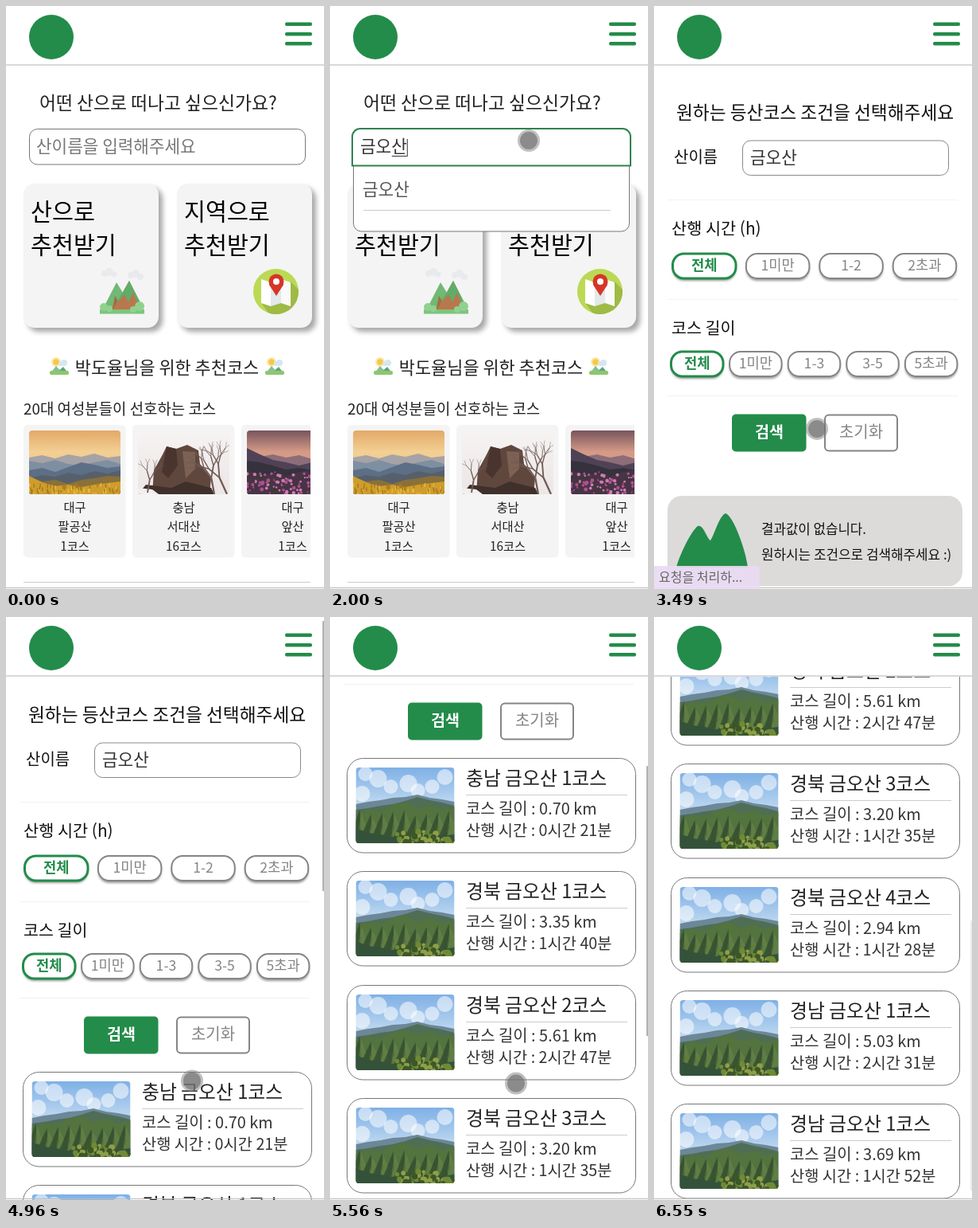
Animation, 400 px wide and 732 px high, one loop 6.68 s. Source, as an HTML page with a canvas:

```html
<!DOCTYPE html>
<html lang="ko">
<head>
<meta charset="utf-8">
<title>등산코스 추천</title>
<style>
html, body { margin: 0; width: 100%; height: 100%; overflow: hidden; background: #fff; }
canvas { display: block; width: 400px; height: 732px; }
</style>
</head>
<body>
<canvas id="stage"></canvas>
<script>
const W = 400, H = 732, LOOP = 6680;
const GREEN = '#238c4a', GREY = '#858585';
const FONT = '"Noto Sans CJK KR", "Noto Sans CJK JP", "Noto Sans", sans-serif';
const canvas = document.getElementById('stage');
const c = canvas.getContext('2d');
const dpr = window.devicePixelRatio || 1;
canvas.width = W * dpr;
canvas.height = H * dpr;

// The screen refreshes in bursts: [start, end, steps]
const ticks = [0];
[[70, 600, 9], [1130, 1130, 1], [1340, 1460, 3], [1610, 1660, 2], [1800, 2000, 3],
 [2470, 3080, 10], [3150, 3760, 10], [3820, 3820, 1], [4020, 4020, 1], [4160, 4220, 2],
 [4490, 4490, 1], [4820, 5420, 10], [5490, 6090, 9], [6170, 6170, 1], [6420, 6550, 2]
].forEach(([a, b, n]) => {
  for (let i = 0; i < n; i++) ticks.push(n > 1 ? a + (b - a) * i / (n - 1) : a);
});

const cursorPath = [[70, 386, 696], [200, 352, 520], [400, 288, 262], [530, 250, 169],
  [2470, 250, 169], [2740, 328, 222], [2900, 348, 262], [3080, 338, 313], [3300, 262, 452],
  [3489, 205, 531], [3760, 169, 534], [3820, 163, 534], [4800, 162, 533], [4886, 234, 582],
  [5420, 234, 585], [5790, 234, 588], [5900, 248, 622], [6090, 303, 728]];
const scrollPath = [[4886, 0], [4953, 11], [5087, 84], [5287, 237], [5420, 344],
  [5790, 668], [5950, 776], [6090, 825]];
const typing = [[1340, 'ㄱ'], [1400, '그'], [1460, '금'], [1610, '금ㅇ'], [1660, '금오'],
  [1800, '금옷'], [1900, '금오사'], [2000, '금오산']];
const matches = {
  '금': ['금오산', '금정산', '금수산', '금학산', '금대봉'],
  '금오': ['금오산', '금오봉'],
  '금오산': ['금오산']
};
const courses = [['충남', 1, '0.70', '0시간 21분'], ['경북', 1, '3.35', '1시간 40분'],
  ['경북', 2, '5.61', '2시간 47분'], ['경북', 3, '3.20', '1시간 35분'],
  ['경북', 4, '2.94', '1시간 28분'], ['경남', 1, '5.03', '2시간 31분'],
  ['경남', 1, '3.69', '1시간 52분']];

function along(path, t) {
  if (t <= path[0][0]) return path[0].slice(1);
  for (let i = 1; i < path.length; i++) {
    const a = path[i - 1], b = path[i];
    if (t <= b[0]) {
      const k = (t - a[0]) / (b[0] - a[0]);
      return a.slice(1).map((v, j) => v + (b[j + 1] - v) * k);
    }
  }
  return path[path.length - 1].slice(1);
}

function random(seed) {
  return () => (seed = (seed * 16807) % 2147483647) / 2147483647;
}

function text(s, x, cy, size, color = '#222', weight = 400, align = 'left') {
  c.font = `${weight} ${size}px ${FONT}`;
  c.textAlign = align;
  c.fillStyle = color;
  c.fillText(s, x, cy + size * 0.37);
}

function box(x, y, w, h, r, fill, stroke, line = 1) {
  c.beginPath();
  c.roundRect(x, y, w, h, r);
  if (fill) { c.fillStyle = fill; c.fill(); }
  if (stroke) { c.shadowColor = 'transparent'; c.strokeStyle = stroke; c.lineWidth = line; c.stroke(); }
}

function shadowed(dx, dy, blur, alpha, draw) {
  c.save();
  c.shadowColor = `rgba(0,0,0,${alpha})`;
  c.shadowOffsetX = dx * dpr;
  c.shadowOffsetY = dy * dpr;
  c.shadowBlur = blur * dpr;
  draw();
  c.restore();
}

function rect(x, y, w, h, color) {
  c.fillStyle = color;
  c.fillRect(x, y, w, h);
}

function dot(x, y, r, color) {
  c.fillStyle = color;
  c.beginPath();
  c.arc(x, y, r, 0, 7);
  c.fill();
}

function poly(color, ...p) {
  c.fillStyle = color;
  c.beginPath();
  for (let i = 0; i < p.length; i += 2) c.lineTo(p[i], p[i + 1]);
  c.fill();
}

function sky(w, h, ...colors) {
  const g = c.createLinearGradient(0, 0, 0, h);
  colors.forEach((col, i) => g.addColorStop(i / (colors.length - 1), col));
  rect(0, 0, w, h, g);
}

// Heights are spread evenly over the width
function ridge(w, h, color, ...ys) {
  const p = ys.flatMap((y, i) => [w * i / (ys.length - 1), y]);
  poly(color, 0, h, ...p, w, h);
}

function photo(x, y, w, h, paint) {
  c.save();
  c.translate(x, y);
  c.beginPath();
  c.roundRect(0, 0, w, h, 4);
  c.clip();
  paint(w, h);
  c.restore();
}

function goldenHills(w, h) {
  sky(w, h, '#e2a968', '#f3cf93', '#eec78e', '#b9a48c');
  ridge(w, h, '#a5a3a5', 34, 31, 35, 30, 33, 29, 34, 32);
  ridge(w, h, '#7f8fa2', 38, 41, 37, 42, 44, 40, 37, 42);
  ridge(w, h, '#5c6f86', 50, 47, 52, 46, 40, 43, 47, 45);
  ridge(w, h, '#57606a', 60, 56, 58, 53, 56, 51, 54, 50);
  ridge(w, h, '#8a7039', 58, 64, 62, 67, 62, 60, 57, 58);
  ridge(w, h, '#cf9d2b', 57, 65, 70, 68, 71, 68, 66, 64);
  const rnd = random(11);
  for (let i = 0; i < 90; i++) {
    const px = rnd() * w;
    rect(px, 66 + rnd() * 14, 1.5, 5, rnd() < 0.5 ? '#e8bd45' : '#a87a1e');
  }
}

function branch(x, y, len, a, depth) {
  const nx = x + Math.cos(a) * len, ny = y + Math.sin(a) * len;
  c.lineWidth = depth * 0.45;
  c.beginPath();
  c.moveTo(x, y);
  c.lineTo(nx, ny);
  c.stroke();
  if (depth > 1) {
    branch(nx, ny, len * 0.75, a - 0.45, depth - 1);
    branch(nx, ny, len * 0.75, a + 0.35, depth - 1);
  }
}

function rockPeak(w, h) {
  sky(w, h, '#f6f3f3', '#ece6e5');
  poly('#60473d', 18, h, 20, 50, 30, 32, 36, 20, 48, 23, 62, 18, 76, 25, 78, 42, 92, 60, 90, h);
  poly('#49342e', 36, 20, 48, 23, 50, 44, 38, 60, 30, 52);
  poly('#7d6254', 56, 26, 72, 27, 72, 48, 60, 60);
  poly('#3f302b', 0, h, 10, 68, 42, 72, 60, 64, 92, 72, 96, h);
  poly('#f3efee', 0, h, 0, 72, 18, 74, 26, h);
  c.strokeStyle = '#6d5a54';
  branch(96, 80, 21, -1.75, 5);
  branch(112, 80, 23, -2, 5);
  branch(12, 78, 16, -1.4, 4);
}

function pinkField(w, h) {
  sky(w, h, '#77545c', '#d59a86', '#d7a08c', '#54405a');
  ridge(w, h, '#8c6d78', 40, 33, 30, 34, 31, 36, 32, 30);
  ridge(w, h, '#4f4256', 22, 30, 37, 40, 44, 40, 42, 36);
  ridge(w, h, '#35323d', 38, 40, 44, 49, 47, 50, 46, 44);
  ridge(w, h, '#493347', 50, 56, 54, 58, 52, 50, 54, 50);
  const rnd = random(5);
  for (let i = 0; i < 130; i++) {
    const px = rnd() * w, py = 52 + rnd() * 28;
    dot(px, py, 1 + rnd() * 1.5, ['#b0508f', '#d07ab5', '#3d3a35'][i % 3]);
  }
}

function greenRidge(w, h) {
  sky(w, h, '#7fb0e6', '#a9cbed', '#dfeaf2', '#dfeaf2');
  [[12, 8, 9], [28, 14, 11], [44, 24, 9], [66, 20, 11], [78, 29, 9], [96, 24, 9], [112, 12, 10], [8, 33, 10]]
    .forEach(([x, y, r]) => dot(x, y, r, 'rgba(255,255,255,.55)'));
  ridge(w, h, '#6c8798', 46, 43, 41, 38, 37, 34, 38, 40, 43);
  ridge(w, h, '#4f6e55', 53, 51, 48, 46, 42, 37, 41, 44, 48);
  ridge(w, h, '#53733f', 58, 52, 55, 47, 44, 51, 47, 53, 50);
  for (let i = 0; i < 9; i++) {
    const x = i * 14 + 5, y = 52 + (i * 7) % 9;
    poly('rgba(37,62,40,.6)', x, y, x - 9, 78, x - 17, h, x - 6, h, x + 1, 76);
    poly('rgba(120,147,78,.35)', x + 2, y + 4, x + 8, 74, x + 2, h, x - 2, 80);
  }
  ridge(w, h, '#34523a', 76, 82, 84, 87, 85, 88, 83, 86, 84);
  const rnd = random(23);
  for (let i = 0; i < 70; i++) {
    const px = 52 + rnd() * 72, top = 78 + Math.abs(px - 82) * 0.18;
    dot(px, top + rnd() * 17, 2 + rnd() * 2, ['#6f8a35', '#3c5727', '#8f9f48'][i % 3]);
  }
}

function mountainIcon() {
  [[124, 336, 4], [130, 334, 5], [136, 337, 3.5], [157, 338, 4], [163, 336, 5], [169, 340, 4]]
    .forEach(([x, y, r]) => dot(x, y, r, '#e8eaed'));
  poly('#a86a45', 122, 384, 139, 349, 160, 384);
  poly('#71b974', 120, 384, 139, 347, 147, 360, 142, 372, 137, 364, 133, 384);
  poly('#b9774d', 133, 384, 155, 345, 174, 384);
  poly('#61ad68', 138, 375, 155, 345, 171, 376, 164, 370, 160, 359, 154, 372, 149, 362);
  rect(118, 381, 56, 5.5, '#7cc57e');
  [[123, 378, 5], [130, 380, 4], [168, 377, 6], [160, 381, 4]].forEach(([x, y, r]) => dot(x, y, r, '#91d18f'));
}

function mapIcon() {
  dot(339.5, 358.5, 28.5, '#bcd955');
  c.save();
  c.beginPath();
  c.arc(339.5, 358.5, 28.5, 0, 7);
  c.clip();
  poly('#9fba45', 358, 346, 380, 368, 362, 392, 335, 392, 322, 374);
  c.restore();
  poly('#fff', 321, 343, 333, 347, 333, 377, 321, 373);
  poly('#e3e8ea', 333, 347, 346, 343, 346, 373, 333, 377);
  poly('#fafafa', 346, 343, 358, 347, 358, 377, 346, 373);
  poly('#d63628', 331, 350, 349, 350, 340, 364);
  dot(340, 346, 9.5, '#d63628');
  dot(340, 346, 4, '#fff');
}

function sunnyIcon(x, y) {
  dot(x + 8, y + 7, 6, '#fbe9a8');
  dot(x + 8, y + 7, 3.8, '#f5c84c');
  dot(x + 14, y + 9, 3, '#d4e7f0');
  dot(x + 18, y + 8, 4, '#d4e7f0');
  poly('#86bd9a', x, y + 22, x + 8, y + 12, x + 17, y + 22);
  poly('#5fa37e', x + 7, y + 22, x + 17, y + 13, x + 24, y + 22);
  box(x, y + 18, 24, 5, 2, '#8dc66f');
}

function search(t) {
  const focus = t >= 599;
  const typed = typing.filter(([at]) => t >= at).pop();
  const value = typed ? typed[1] : '';
  const list = matches[value] || [];
  if (list.length) {
    box(29.5, 195.5, 347, 29.5 + 58 * list.length, [0, 0, 10, 10], '#fff', '#777');
    list.forEach((name, i) => {
      text(name, 41, 230 + i * 58, 21.3, '#555', 300);
      rect(42, 256 + i * 58, 311, 1, '#ccc');
    });
  }
  const r = list.length ? [10, 10, 0, 0] : 10;
  if (focus) box(28, 154, 350, 46.5, r, '#fff', '#2f8250', 2);
  else box(29.5, 154.5, 347, 44.5, 10, '#fff', '#777');

  if (!value) text('산이름을 입력해주세요', 38, 176, 21.3, '#777', 300);
  else text(value, 38, 176, 21.3, '#333', 300);
  const end = 38 + (value ? c.measureText(value).width : 0);
  if (value && t < 2880) rect(end - 19, 188, 19, 1, '#333');
  if (focus && (t < 1130 || (value && t < 2470))) rect(end, 167, 1, 22, '#333');
}

function home(t) {
  text('어떤 산으로 떠나고 싶으신가요?', 42, 122, 22.8);
  [[22, '산으로', 32], [215, '지역으로', 225]].forEach(([x, label, tx]) => {
    shadowed(5, 5, 6, 0.35, () => box(x, 223, 170, 181, 14, '#f4f4f4'));
    text(label, tx - 1, 258, 29.3, '#000', 500);
    text('추천받기', tx - 1, 300, 29.3, '#000', 500);
  });
  mountainIcon();
  mapIcon();
  sunnyIcon(55, 440);
  sunnyIcon(326, 440);
  text('박도율님을 위한 추천코스', 202.5, 454, 21.9, '#222', 400, 'center');
  text('20대 여성분들이 선호하는 코스', 22, 506, 18.9);

  c.save();
  c.beginPath();
  c.rect(22, 520, 361, 180);
  c.clip();
  [['대구', '팔공산', '1코스', goldenHills], ['충남', '서대산', '16코스', rockPeak],
   ['대구', '앞산', '1코스', pinkField]].forEach(([area, name, no, paint], i) => {
    const x = 22 + i * 137;
    box(x, 526, 128.5, 166.5, 5, '#f4f4f4');
    photo(x + 7, 533, 115, 80, paint);
    [area, name, no].forEach((s, j) => text(s, x + 64.5, 629 + j * 24.5, 15.3, '#222', 400, 'center'));
  });
  c.restore();
  rect(22, 723, 361, 1, '#ccc');
  search(t);
}

function pills(labels, x0, pitch, w, y) {
  labels.forEach((label, i) => {
    const x = x0 + i * pitch, on = i === 0;
    shadowed(0, 3, 3, 0.4, () => box(x + 1, y + 1, w - 2, 31, 14, '#fff'));
    box(x + 1, y + 1, w - 2, 31, 14, '#fff', on ? GREEN : GREY, on ? 3 : 2);
    text(label, x + w / 2, y + 15.5, 17.7, on ? GREEN : GREY, on ? 600 : 500, 'center');
  });
}

function course([area, no, km, time], y, loaded) {
  box(21.5, y + 0.5, 363, 118.5, 20, '#fff', '#777');
  if (loaded) photo(32.5, y + 12, 124, 95, greenRidge);
  text(`${area} 금오산 ${no}코스`, 171, y + 25.5, 23.8);
  rect(171, y + 46, 203, 1, '#ccc');
  text(`코스 길이 : ${km} km`, 171, y + 63.5, 19.9, '#333', 300);
  text(`산행 시간 : ${time}`, 171, y + 90.5, 19.8, '#333', 300);
}

function emptyNotice() {
  box(17, 615, 371, 113.5, 18, '#dddada');
  c.fillStyle = GREEN;
  c.beginPath();
  c.moveTo(28, 705);
  c.bezierCurveTo(32, 690, 46, 660, 55, 653);
  c.bezierCurveTo(62, 650, 66, 668, 71, 671);
  c.bezierCurveTo(76, 664, 82, 640, 90, 637);
  c.bezierCurveTo(100, 640, 116, 685, 118, 705);
  c.fill();
  text('결과값이 없습니다.', 135, 657, 16.8, '#111', 500);
  text('원하시는 조건으로 검색해주세요 :)', 135, 689, 16.9, '#111', 500);
}

function finder(t, scroll) {
  c.save();
  c.translate(0, -scroll);
  text('원하는 등산코스 조건을 선택해주세요', 28, 134, 22.7, '#111', 500);
  text('산이름', 25, 189.5, 20, '#111', 500);
  box(111.5, 169, 259, 43.5, 10, '#fff', '#888');
  text('금오산', 121, 190, 21.3, '#333', 300);
  [243, 368, 489].forEach(y => rect(17, y, 365, 1, '#f2f2f2'));
  text('산행 시간 (h)', 22, 279, 20.8, '#111', 500);
  pills(['전체', '1미만', '1-2', '2초과'], 22.5, 92.4, 81.5, 310);
  text('코스 길이', 22, 404, 20.6, '#111', 500);
  pills(['전체', '1미만', '1-3', '3-5', '5초과'], 20.5, 73.6, 67.5, 433);
  box(98, 512.5, 93.5, 47, 5, GREEN);
  text('검색', 145, 535, 19.6, '#fff', 700, 'center');
  box(215, 513.5, 91, 45, 5, '#fff', GREY, 2);
  text('초기화', 260.5, 535, 20, GREY, 500, 'center');
  if (t < 4160) emptyNotice();
  else courses.forEach((item, i) => {
    const y = Math.round(582 + i * 142.4);
    if (y - scroll < H && y - scroll > -60) course(item, y, t >= 4220);
  });
  c.restore();
}

function header() {
  rect(0, 0, W, 73, '#fff');
  rect(0, 73, W, 2, '#d9d9d9');
  dot(57, 39, 28, GREEN);
  [20.5, 33, 45].forEach(y => box(351, y, 34, 4.5, 2, GREEN));
}

function cursor(t) {
  if (t < 70 || t >= 6170) return;
  const [x, y] = along(cursorPath, t);
  const press = t >= 4020 && t < 4220 ? 1 : 0;
  dot(x, y, 14 + press, 'rgba(130,130,130,.5)');
  dot(x, y, 11 + press, 'rgba(110,110,110,.65)');
}

function draw(t) {
  c.setTransform(dpr, 0, 0, dpr, 0, 0);
  rect(0, 0, W, H, '#fff');
  const scroll = Math.round(along(scrollPath, t)[0]);
  if (t < 3150) home(t);
  else finder(t, scroll);
  header();
  rect(0, 730, W, 1, '#bbb');
  if (t >= 3215 && t < 3690) {
    box(0, 703, 132.5, 29, [0, 4, 0, 0], 'rgba(234,220,243,.92)');
    text('요청을 처리하...', 6, 717, 16, '#666');
  }
  if (scroll > 0) {
    const alpha = t < 6420 ? 0.3 : t < 6550 ? 0.18 : 0.08;
    rect(398, scroll * 0.462, 2, 339, `rgba(0,0,0,${alpha})`);
  }
  cursor(t);
}

function loop(now) {
  const t = now % LOOP;
  draw(ticks.filter(k => k <= t).pop());
  requestAnimationFrame(loop);
}
draw(0);
requestAnimationFrame(loop);
</script>
</body>
</html>
```
